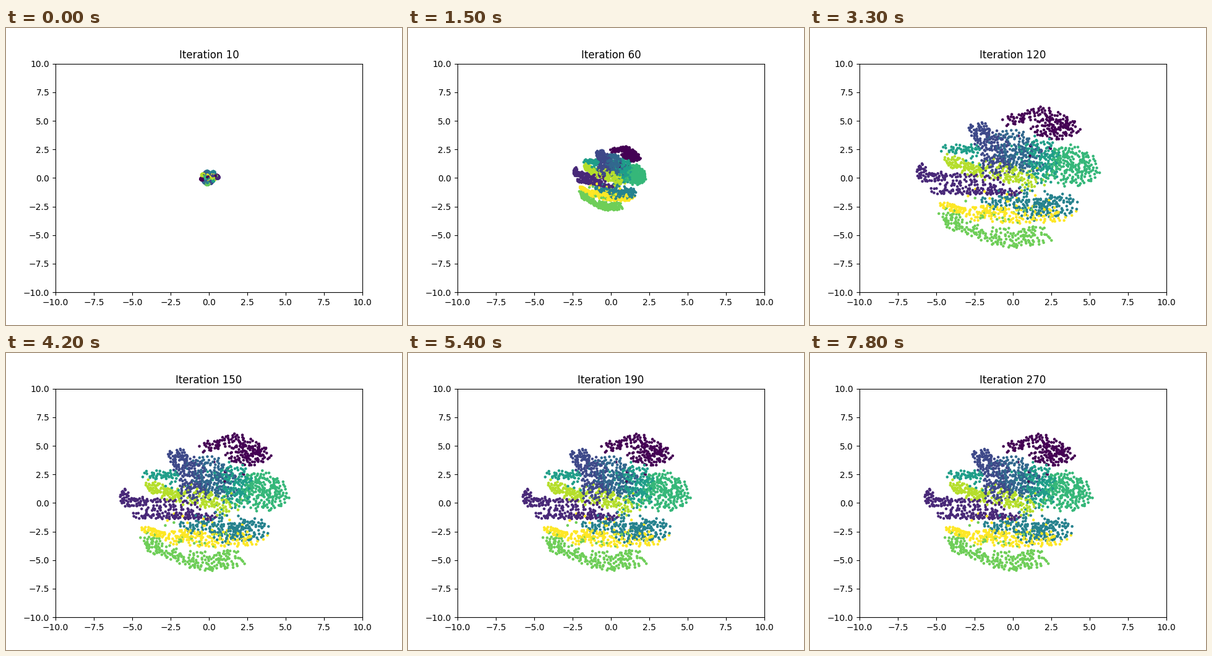
Recreate the animation shown at these times as a matplotlib script. Size 640 by 480 pixels, loop 8 s.

```python
import matplotlib.pyplot as plt
import numpy as np
from matplotlib.animation import FuncAnimation

STEP_MS, TICKS_PER_STEP, TICKS = 100, 3, 80
CLASSES, CLUMPS = 10, 3
rng = np.random.default_rng(7)
points, labels = [], []


def along(path, count):
    """Random positions on a polyline, even by length."""
    length = np.hypot(*np.diff(path, axis=0).T).cumsum()
    length = np.insert(length, 0, 0)
    at = rng.uniform(0, length[-1], count)
    return np.column_stack([np.interp(at, length, axis) for axis in path.T])


def disc(count):
    angle = rng.uniform(0, 2 * np.pi, count)
    radius = np.sqrt(rng.uniform(0, 1, count))
    return np.column_stack([radius * np.cos(angle), radius * np.sin(angle)])


def stroke(label, count, width, *path):
    """Fill a thick polyline with dots that tend to keep apart."""
    path = np.array(path, float)
    for _ in range(count):
        options = along(path, 2) + width * disc(2)
        gaps = options[:, None] - np.array(points or [(0, 0)])
        points.append(options[np.argmax((gaps ** 2).sum(axis=2).min(axis=1))])
        labels.append(label)


# Settled shape of each class
stroke(0, 120, .5, (-.4, 4.8), (1.9, 5.7), (3.9, 4))
stroke(0, 85, .9, (1.9, 4.3), (3, 4.1))
stroke(1, 75, .4, (-5.4, 1), (-5.3, 0), (-4.3, .1))
stroke(1, 100, .28, (-4.8, -1.1), (.3, -1.25))
stroke(1, 65, .7, (-4.1, -.2), (-1.2, -.5))
stroke(2, 80, .75, (-2.1, 4.1), (-1.8, 3.6))
stroke(2, 135, 1, (-1.2, 3.4), (-1, .6))
stroke(3, 185, 1.3, (-.3, 3), (.8, 1.4))
stroke(4, 85, .6, (-1.6, -2.2), (1.5, -2.1))
stroke(4, 130, 1, (1, -2.8), (3.2, -2.2))
stroke(5, 55, .4, (-4, 2.4), (-2.2, 2.5))
stroke(5, 145, 1, (.6, 2.8), (1.9, 2.4), (1.7, .2))
stroke(6, 225, 1.5, (3.3, 1.4), (3.8, .7))
stroke(7, 90, .6, (-3.9, -2.9), (-3.4, -4), (-2, -4.6))
stroke(7, 140, .8, (-1.8, -4.7), (-.2, -5.2), (1.8, -4.8))
stroke(8, 85, .5, (-3.9, 1.6), (-2.2, .5))
stroke(8, 120, 1, (-1.8, .9), (1.2, -.1))
stroke(9, 45, .35, (-4.1, -2.3), (-2.9, -2.9))
stroke(9, 165, .75, (-2.6, -3), (1, -3.2), (3.2, -2.9))

order = rng.permutation(len(labels))
labels = np.array(labels)[order]
settled = np.array(points)[order]

# A few dots of every class stray towards the middle
stray = rng.random(len(labels)) < .15
settled[stray] = settled[stray] * rng.uniform(.5, 1, (stray.sum(), 1)) + .4 * disc(stray.sum())

# Crowded layout: shrunk, slightly turned, dense at the rim
unit = settled / (5.6, 6.1)
radius = np.hypot(*unit.T)[:, None]
turn = np.array([[1, .12], [-.12, 1]])
crowded = unit * radius ** -.15 @ turn.T * (2.4, 2.9)

# Small clumps that the layout grows from
clumps = .55 * disc(CLASSES * CLUMPS).reshape(CLASSES, CLUMPS, 2)
seeded = clumps[labels, rng.integers(0, CLUMPS, len(labels))] + .13 * disc(len(labels))


def layout(iteration):
    grow = np.clip((iteration - 10) / 50, 0, 1)
    spread = np.clip((iteration - 60) / 60, 0, 1) ** 3
    overshoot = np.exp(-max(iteration - 120, 0) / 12)
    stretch = 1 + overshoot * np.array([.09, .03])
    early = seeded + grow * (crowded - seeded)
    return early + spread * (settled * stretch - early)


fig, ax = plt.subplots(figsize=(6.4, 4.8), dpi=100)
ax.set(xlim=(-10, 10), ylim=(-10, 10))
dots = ax.scatter(*seeded.T, s=5, c=labels, cmap="viridis")
title = ax.set_title("")


def draw(tick):
    iteration = 10 * (tick // TICKS_PER_STEP + 1)
    dots.set_offsets(layout(iteration))
    title.set_text(f"Iteration {iteration}")
    return dots, title


anim = FuncAnimation(fig, draw, frames=TICKS, interval=STEP_MS, repeat=True, repeat_delay=0)
plt.show()
```
